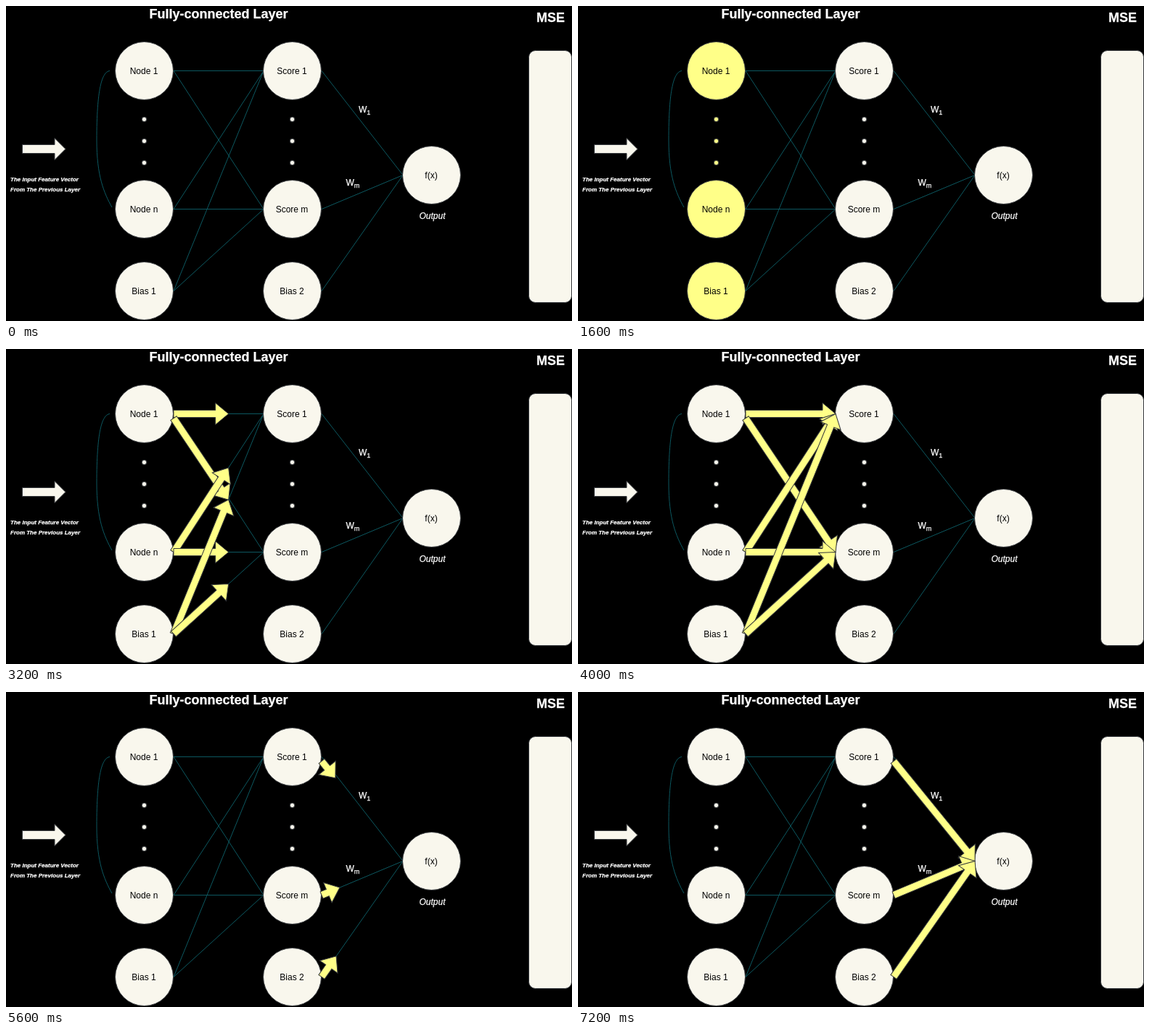
Write an HTML page that moves like this. It is 780 px wide and 435 px high and loops after 8000 ms.

```html
<!DOCTYPE html>
<html lang="en">
<head>
<meta charset="utf-8">
<title>Fully-connected layer</title>
<style>
  html, body { margin: 0; width: 100%; height: 100%; overflow: hidden; background: #000; }
  svg { display: block; width: 780px; height: 435px; font-family: "Liberation Sans", Arial, sans-serif; }
  text { fill: #fff; stroke: #fff; stroke-width: .25px; font-size: 12px; text-anchor: middle; }
  .node text { fill: #000; stroke: none; }
  .title { font-size: 18px; font-weight: bold; }
  .note { font: italic bold 8px "Liberation Sans", Arial, sans-serif; text-anchor: start; }
  .left { text-anchor: start; }
  .sub { font-size: 9px; }
  .wire { fill: none; stroke: #0c5860; }
  .shape { fill: #f9f7ed; stroke: #36393d; }
  .glow, .step { animation: glow 8s step-end infinite; animation-delay: calc(var(--i) * .8s - 8s); }
  .step { animation-name: show; visibility: hidden; }
  .step .shape { fill: #ffff88; }
  @keyframes glow { 0% { fill: #ffff88; } 10%, 100% { fill: #f9f7ed; } }
  @keyframes show { 0% { visibility: visible; } 10%, 100% { visibility: hidden; } }
</style>
</head>
<body>
<svg id="stage" viewBox="0 0 780 435">
  <text class="title" x="293" y="17">Fully-connected Layer</text>
  <text class="title" x="750.5" y="22">MSE</text>
  <rect class="shape" x="720.5" y="61.5" width="59" height="348" rx="9"/>
  <text class="note" x="6" y="242">The Input Feature Vector</text>
  <text class="note" x="6" y="256">From The Previous Layer</text>
  <path class="wire" d="M143 89.5C132 91 125 115 125 185C125 235 135 258 146 278"/>
  <g id="wires"></g>
  <g id="nodes"></g>
  <g id="flow"></g>
  <text x="587.5" y="294" font-style="italic">Output</text>
  <text class="left" x="486" y="146.5">W<tspan class="sub" dy="3">1</tspan></text>
  <text class="left" x="468.5" y="247.5">W<tspan class="sub" dy="3">m</tspan></text>
</svg>
<script>
const $ = id => document.getElementById(id);
const R = 40;
const rows = [89.5, 280.5, 393.5];
const reach = [30, 27, 35]; // length of the first arrows, per row

function add(parent, tag, attrs, text) {
  const el = document.createElementNS('http://www.w3.org/2000/svg', tag);
  for (const key in attrs) el.setAttribute(key, attrs[key]);
  if (text) el.textContent = text;
  return parent.appendChild(el);
}

// Block arrow, drawn along the x axis and turned into place
function arrow(parent, x, y, angle, len, { shaft = 5, head = 18, ...attrs } = {}) {
  const neck = len - head;
  const d = `M0 ${-shaft}H${neck}V-15L${len} 0L${neck} 15V${shaft}H0Z`;
  add(parent, 'path', { class: 'shape', d, transform: `translate(${x} ${y}) rotate(${angle})`, ...attrs });
}

const glow = i => i ? { class: 'shape glow', style: `--i:${i}` } : { class: 'shape' };

function node(x, y, label, i) {
  const g = add($('nodes'), 'g', { class: 'node' });
  add(g, 'circle', { cx: x, cy: y, r: R, ...glow(i) });
  add(g, 'text', { x: x - .5, y: y + 4.5 }, label);
}

function column(x, labels, i) {
  labels.forEach((label, row) => node(x, rows[row], label, i));
  for (let k = 0; k < 3; k++) add($('nodes'), 'circle', { cx: x, cy: 156.5 + 30 * k, r: 3.2, ...glow(i) });
}

// Link every row of one column to the targets; arrows grow in three steps
function connect(x, toX, targets, first) {
  const steps = [0, 1, 2].map(k => add($('flow'), 'g', { class: 'step', style: `--i:${first + k}` }));
  const x1 = x + R + .5, x2 = toX - R + .5;
  rows.forEach((y, row) => {
    for (const y2 of targets) {
      add($('wires'), 'path', { class: 'wire', d: `M${x1} ${y}L${x2} ${y2}` });
      const y1 = y2 > y ? y + 6 : y; // downward arrows leave a little lower
      const len = Math.hypot(x2 - x1, y2 - y1);
      const angle = Math.atan2(y2 - y1, x2 - x1) * 180 / Math.PI;
      [reach[row], len * .61, len].forEach((l, k) => arrow(steps[k], x1, y1, angle, l));
    }
  });
}

const [inX, midX, outX, outY] = [190.5, 394.5, 586.5, 233.5];
arrow($('nodes'), 22.5, 197.5, 0, 59.5, { shaft: 6, head: 15, ...glow(1) });
column(inX, ['Node 1', 'Node n', 'Bias 1'], 2);
column(midX, ['Score 1', 'Score m', 'Bias 2'], 6);
node(outX, outY, 'f(x)');
connect(inX, midX, rows.slice(0, 2), 3);
connect(midX, outX, [outY], 7);
</script>
</body>
</html>
```
